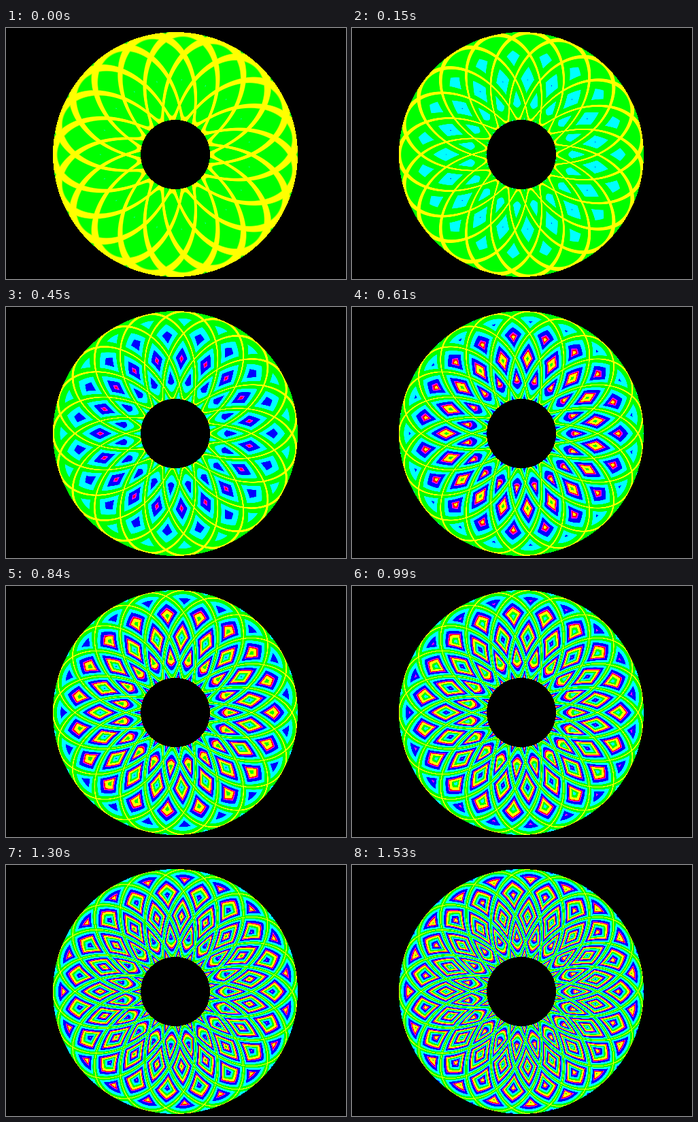
Animation, 500 px wide and 369 px high, one loop 1600 ms. Source, as an HTML page with a canvas:

```html
<!DOCTYPE html>
<html lang="en">
<head>
<meta charset="utf-8">
<title>Rainbow ring</title>
<style>
html, body { margin: 0; width: 100%; height: 100%; overflow: hidden; background: #000; }
canvas { display: block; }
</style>
</head>
<body>
<canvas id="stage" width="500" height="369"></canvas>
<script>
const W = 500, H = 369, CX = 249, CY = 186;
const INNER = 51, OUTER = 180;
const LOBES = 19, TURNS = 5, POWER = 1.9;
const BAND = 36.5, PERIOD = 4.43, SHIFT = 0.78, SOFT = 0.06;
const LOOP = 1600, STEPS = 21;

const ctx = document.getElementById('stage').getContext('2d');
const image = ctx.createImageData(W, H);
const pixels = image.data;

const clamp = x => Math.max(0, Math.min(1, x));
const ramp = x => clamp(x / SOFT + 0.5);
const gate = (x, from, to) => ramp(x - from) * ramp(to - x);

// Rosette radius, swinging between the two rims
const low = INNER ** POWER, high = OUTER ** POWER;
const rosette = a => ((high + low + (high - low) * Math.cos(LOBES / TURNS * a)) / 2) ** (1 / POWER);

// Radial distance to the nearest winding
function gap(r, angle) {
  let best = Infinity;
  for (let j = 0; j < TURNS; j++) {
    best = Math.min(best, Math.abs(r - rosette(angle + 2 * Math.PI * j)));
  }
  return best;
}

const cells = [];
for (let y = 0; y < H; y++) {
  for (let x = 0; x < W; x++) {
    const dx = x + 0.5 - CX, dy = y + 0.5 - CY, r = Math.hypot(dx, dy);
    const i = 4 * (y * W + x);
    pixels[i + 3] = 255;
    if (r >= INNER && r <= OUTER) cells.push([i, gap(r, Math.atan2(dy, -dx)) / BAND]);
  }
}

// Yellow, green, cyan, blue, magenta, red from three overlapping channels
function paint(i, value) {
  const p = (value + SHIFT) % PERIOD;
  pixels[i] = 255 * (1 - gate(p, 0.95, 3.78));
  pixels[i + 1] = 255 * gate(p, 0, 2.78);
  pixels[i + 2] = 255 * gate(p, 1.78, 4.08);
}

function draw(step) {
  const scale = 1 + step / 2;
  for (const [i, d] of cells) paint(i, d * scale);
  ctx.putImageData(image, 0, 0);
}

const stepAt = time => Math.min(STEPS - 1, Math.floor(time % LOOP / LOOP * STEPS + 0.08));

const start = performance.now();
let shown = 0;
draw(0);
function tick() {
  const step = stepAt(performance.now() - start);
  if (step !== shown) draw(shown = step);
  requestAnimationFrame(tick);
}
requestAnimationFrame(tick);
</script>
</body>
</html>
```
